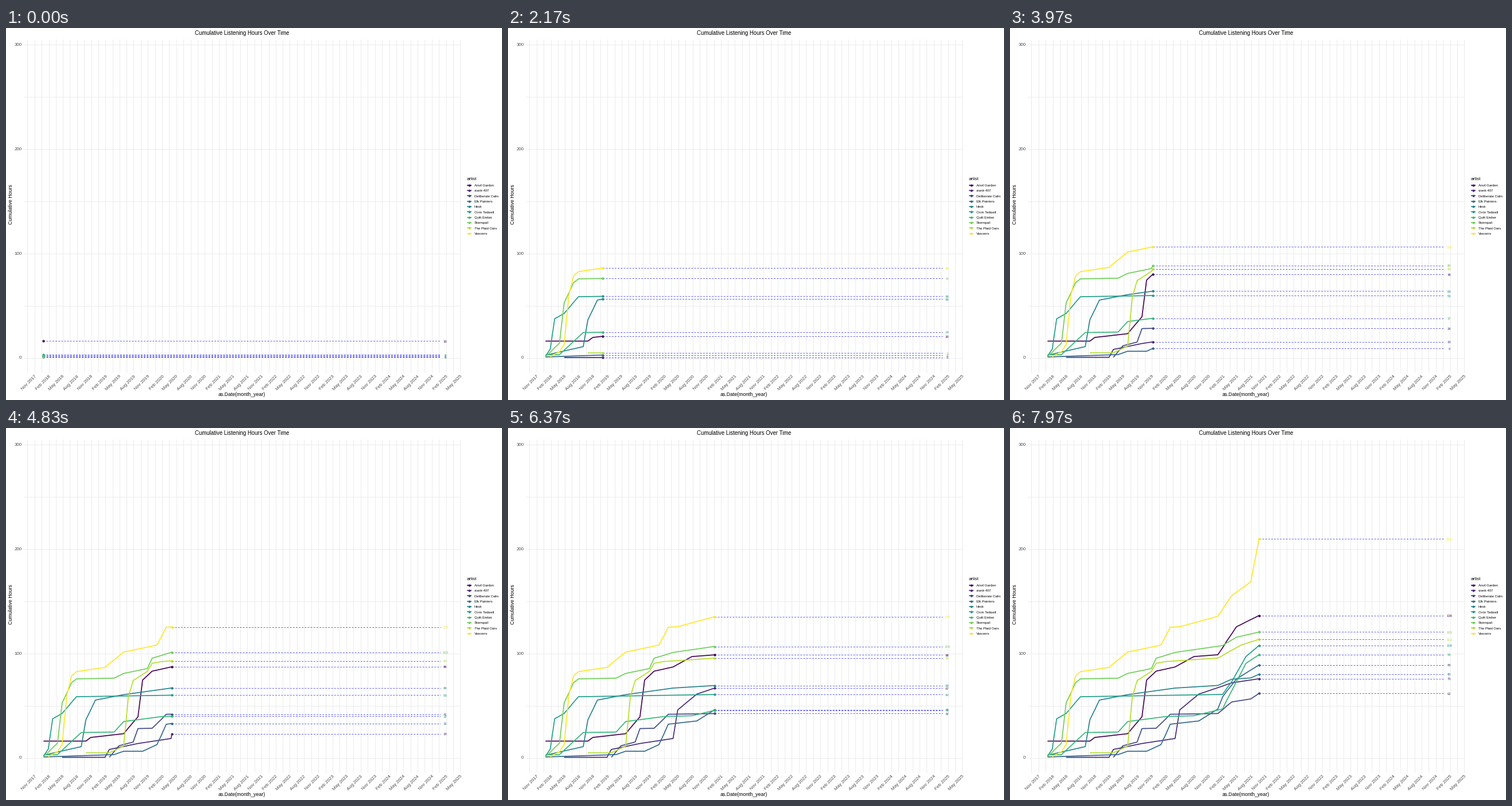
Recreate the animation shown at these times as a matplotlib script. Size 864 px wide and 648 px high, loop 8000 ms.

```python
import numpy as np
import matplotlib.pyplot as plt
from matplotlib.animation import FuncAnimation
from matplotlib.collections import LineCollection

W, H, DPI = 864, 648, 72
STEPS = 240
FRAMES = STEPS + 1  # the last step is held
INTERVAL = 8000 / FRAMES
DAYS_PER_STEP = 2557 / 449
X0, PX_PER_DAY = 65.3, 0.27068
Y0, PX_PER_HOUR = 573.6, 1.8187
X_END, X_LABEL = 757.4, 765
LEFT, RIGHT, TOP, BOTTOM = 30.7, 792, 20, 600
GRID, GREY = "#EBEBEB", "#4D4D4D"

plt.rcParams["font.family"] = "Liberation Sans"


def month_days(start, stop, step=1):
    months = np.arange(start, stop, step, dtype="datetime64[M]")
    days = months.astype("datetime64[D]") - np.datetime64("2018-01-01")
    return months, days.astype(float)


def to_x(day):
    return X0 + PX_PER_DAY * day


def to_y(hours):
    return Y0 - PX_PER_HOUR * hours


_, DAYS = month_days("2018-01", "2021-12")
series = []


def add(name, *turns):
    """Monthly totals growing evenly between (month, hours) turning points."""
    keys, hours = zip(*turns)
    k = np.arange(keys[0], keys[-1] + 1)
    series.append((name, DAYS[k], np.interp(k, keys, hours)))


add("Anvil Garden", (0, 15.5), (9, 15.5), (10, 19), (17, 22.6), (20, 38.8),
    (21, 74), (23, 82.5), (27, 86.5), (31, 96.5), (36, 98.2), (40, 125),
    (45, 136.4))
add("crank-407", (4, 0), (13, 0), (14, 7.5), (20, 13.2), (27, 18),
    (28, 45.4), (32, 60.5), (39, 71.3), (45, 75.4))
add("Deliberate Calm", (14, 0), (16, 11), (19, 14.6), (20, 27.5), (23, 27.8),
    (26, 41.2), (36, 41.9), (39, 53), (43, 55.9), (45, 62))
add("Elk Painters", (0, 0.3), (15, 2.6), (17, 5.8), (21, 5.8), (24, 12.1),
    (26, 31.7), (32, 34.8), (36, 46.2), (37, 57.8), (40, 75), (45, 89.2))
add("Hesk", (0, 1.9), (8, 10.2), (9, 36), (11, 54.8), (17, 60), (27, 66.3),
    (36, 68.8), (39, 74.8), (43, 76), (45, 80.1))
add("Orrin Tedwell", (0, 1), (1, 8), (2, 36.9), (4, 42), (7, 58), (37, 60.2),
    (39, 72.4), (42, 96.5), (45, 108.1))
add("Quilt Ember", (0, 2.3), (3, 2.5), (8, 23.7), (15, 24.2), (17, 34.2),
    (25, 39), (31, 39.8), (37, 46.3), (42, 90), (45, 99))
add("Stormpail", (0, 0.6), (3, 13.5), (4, 52), (6, 71.5), (7, 75.1),
    (15, 75.8), (17, 80.3), (22, 85), (23, 94.9), (27, 100.4), (37, 107),
    (40, 115), (45, 120.2))
add("The Plaid Oars", (9, 4.3), (14, 4.3), (17, 10.8), (18, 57.7), (19, 73.5),
    (22, 82.3), (23, 90), (25, 91.7), (36, 95), (41, 107.5), (45, 113.4))
add("Vascerro", (1, 0.5), (3, 5.3), (4, 12.4), (5, 60), (6, 77.9), (7, 82),
    (13, 86.1), (17, 100.7), (24, 107.5), (26, 124.6), (28, 125), (36, 135),
    (39, 154.8), (43, 168), (45, 215.4))

colors = [plt.cm.viridis(i / 9) for i in range(len(series))]

fig = plt.figure(figsize=(W / DPI, H / DPI), dpi=DPI, facecolor="white")
ax = fig.add_axes([0, 0, 1, 1])
ax.set_xlim(0, W)
ax.set_ylim(H, 0)
ax.axis("off")


def write(x, y, text, size, color="black", ha="center", rotation=0, z=1):
    return ax.text(x, y, text, size=size, color=color, ha=ha, va="baseline",
                   rotation=rotation, rotation_mode="anchor", zorder=z)


def draw_grid():
    ticks, days = month_days("2017-08", "2025-06", 3)
    xs = to_x(days)
    minor = (xs[:-1] + xs[1:]) / 2
    # Pixel centres keep the hairlines crisp.
    gx = np.round(np.concatenate([xs[1:], minor])) + 0.5
    gy = np.round(to_y(np.arange(0, 301, 50))) + 0.5
    lines = [[(x, TOP), (x, BOTTOM)] for x in gx]
    lines += [[(LEFT, y), (RIGHT, y)] for y in gy]
    ax.add_collection(LineCollection(lines, colors=GRID, linewidths=1,
                                     zorder=0))
    names = {2: "Feb", 5: "May", 8: "Aug", 11: "Nov"}
    for tick, x in zip(ticks[1:], xs[1:]):
        year, month = str(tick).split("-")
        write(x + 4.2, 607, f"{names[int(month)]} {year}", 8, GREY,
              "right", 45)
    for v in range(0, 301, 100):
        write(27.5, to_y(v) + 2.9, str(v), 8, GREY, "right")


def draw_legend():
    write(802.3, 264.7, "artist", 8, ha="left")
    for i, ((name, _, _), color) in enumerate(zip(series, colors)):
        y = 273.7 + 9.33 * i
        ax.plot([803.4, 811.4], [y, y], color=color, lw=1.6,
                solid_capstyle="butt")
        ax.plot(807.4, y, "o", color=color, ms=4, mew=0)
        write(807.4, y + 2.2, "a", 5.8, color, z=3)
        write(815.8, y + 2.2, name, 5.85, ha="left")


draw_grid()
draw_legend()
write(411, 12, "Cumulative Listening Hours Over Time", 9.67)
write(411, 641.3, "as.Date(month_year)", 8.8)
write(11, 307.5, "Cumulative Hours", 8.8, rotation=90)

trails, guides, dots, tags = [], [], [], []
for color in colors:
    trails.append(ax.plot([], [], color=color, lw=1.7, zorder=4,
                          solid_capstyle="butt", solid_joinstyle="round")[0])
    guides.append(ax.plot([], [], color="blue", alpha=0.68, lw=0.9, zorder=5,
                          dashes=(3.3, 2.4), dash_capstyle="butt")[0])
    dots.append(ax.plot([], [], "o", color=color, ms=4.3, mew=0, zorder=6)[0])
    tags.append(write(X_LABEL, 0, "", 5.85, color, z=7))


def update(frame):
    day = min(frame, STEPS - 1) * DAYS_PER_STEP
    x = to_x(day)
    for (_, days, hours), trail, guide, dot, tag in zip(
            series, trails, guides, dots, tags):
        if day < days[0]:
            for line in (trail, guide, dot):
                line.set_data([], [])
            tag.set_text("")
            continue
        n = np.searchsorted(days, day, side="right")
        y = to_y(np.interp(day, days, hours))
        trail.set_data(np.append(to_x(days[:n]), x),
                       np.append(to_y(hours[:n]), y))
        guide.set_data([x, X_END], [y, y])
        dot.set_data([x], [y])
        # The printed total jumps halfway between two months.
        nearest = np.argmin(np.abs(days - day))
        tag.set_text(f"{hours[nearest]:.0f}")
        tag.set_y(y + 2.5)
    return trails + guides + dots + tags


anim = FuncAnimation(fig, update, frames=FRAMES, interval=INTERVAL,
                     init_func=lambda: update(0), repeat=True,
                     repeat_delay=0, blit=False)
plt.show()
```
